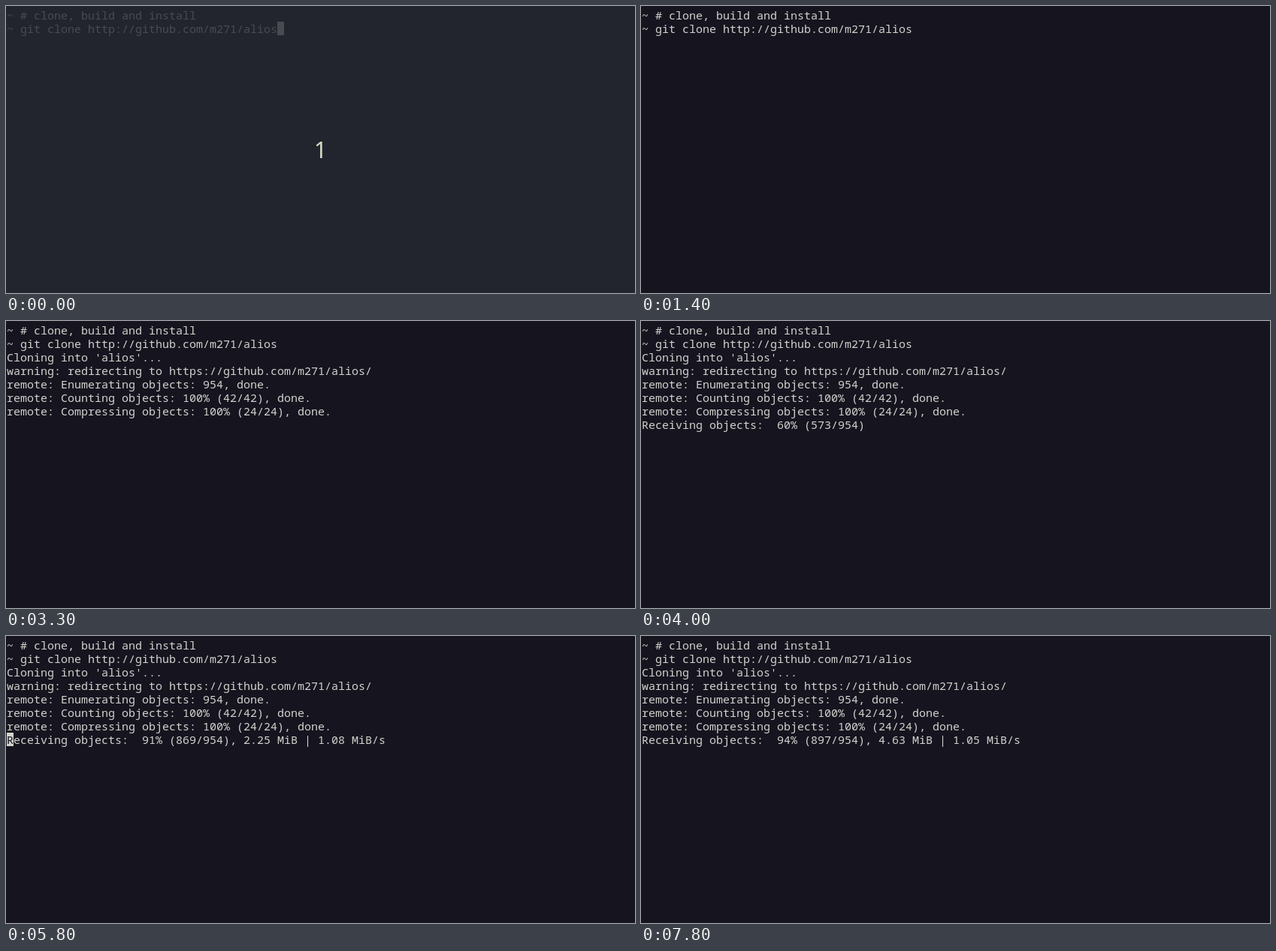
An HTML page that plays this animation: 837x383 px, repeating every 8 s.

```html
<!DOCTYPE html>
<html lang="en">
<head>
<meta charset="utf-8">
<style>
  html, body { margin: 0; width: 100%; height: 100%; overflow: hidden; background: #16141f; }
  #stage { position: relative; width: 837px; height: 383px; overflow: hidden;
    --bg: #16141f; --fg: #d3d2cd; background: var(--bg); color: var(--fg); }
  #stage.dim { --bg: #22252e; --fg: #494b51; }
  pre { position: absolute; left: 1px; top: 3px; margin: 0;
    font: 15px/18px "Noto Sans Mono", monospace; font-variant-ligatures: none; }
  #cursor { position: absolute; width: 9px; height: 18px; margin: 0;
    background: var(--fg); color: var(--bg); }
  #count { position: absolute; left: 0; width: 100%; top: 171px; display: none;
    text-align: center; color: #d7dcc6; font: 30px/41px "Noto Sans", sans-serif; }
  .dim #count { display: block; }
</style>
</head>
<body>
<div id="stage">
  <pre id="text"></pre>
  <pre id="cursor"></pre>
  <div id="count">1</div>
</div>
<script>
const LOOP = 8000, BLINK = 600;
const $ = id => document.getElementById(id);
const stage = $("stage"), text = $("text"), cursor = $("cursor");

// [time, line]
const log = [
  [0, "~ # clone, build and install"],
  [0, "~ git clone http://github.com/m271/alios"],
  [2300, "Cloning into 'alios'..."],
  [2900, "warning: redirecting to https://github.com/m271/alios/"],
  [3300, "remote: Enumerating objects: 954, done."],
  [3300, "remote: Counting objects: 100% (42/42), done."],
  [3300, "remote: Compressing objects: 100% (24/24), done."]
];

// [time, objects received, throughput]
const progress = [
  [3400, 220, ""],
  [3500, 573, ""],
  [4400, 576, ", 1.12 MiB | 1.06 MiB/s"],
  [5300, 668, ", 2.25 MiB | 1.08 MiB/s"],
  [5400, 782, ", 2.25 MiB | 1.08 MiB/s"],
  [5500, 869, ", 2.25 MiB | 1.08 MiB/s"],
  [6800, 869, ", 3.39 MiB | 998.00 KiB/s"],
  [7800, 897, ", 4.63 MiB | 1.05 MiB/s"]
];

function cursorOn(t) {
  if (t < 2300) return t < 200 || Math.floor((t - 200) / BLINK) % 2 === 1;
  return t < 2800 || Math.floor((t - 2800) / BLINK) % 2 === 1;
}

function draw(now) {
  const t = now % LOOP;
  const lines = log.filter(([at]) => t >= at).map(([, line]) => line);
  let row = t < 2300 ? 1 : lines.length;
  const col = t < 2300 ? lines[1].length : 0;

  const step = progress.filter(([at]) => t >= at).pop();
  if (step) {
    const [, done, rate] = step;
    const percent = String(Math.floor(done / 954 * 100)).padStart(3);
    lines.push(`Receiving objects: ${percent}% (${done}/954)${rate}`);
  }

  stage.className = t < 100 ? "dim" : "";
  text.textContent = lines.join("\n");
  cursor.style.display = cursorOn(t) ? "block" : "none";
  cursor.style.left = 1 + 9 * col + "px";
  cursor.style.top = 3 + 18 * row + "px";
  cursor.textContent = (lines[row] || "")[col] || "";
}

const start = performance.now();
function tick() {
  draw(performance.now() - start);
  requestAnimationFrame(tick);
}
tick();
</script>
</body>
</html>
```
